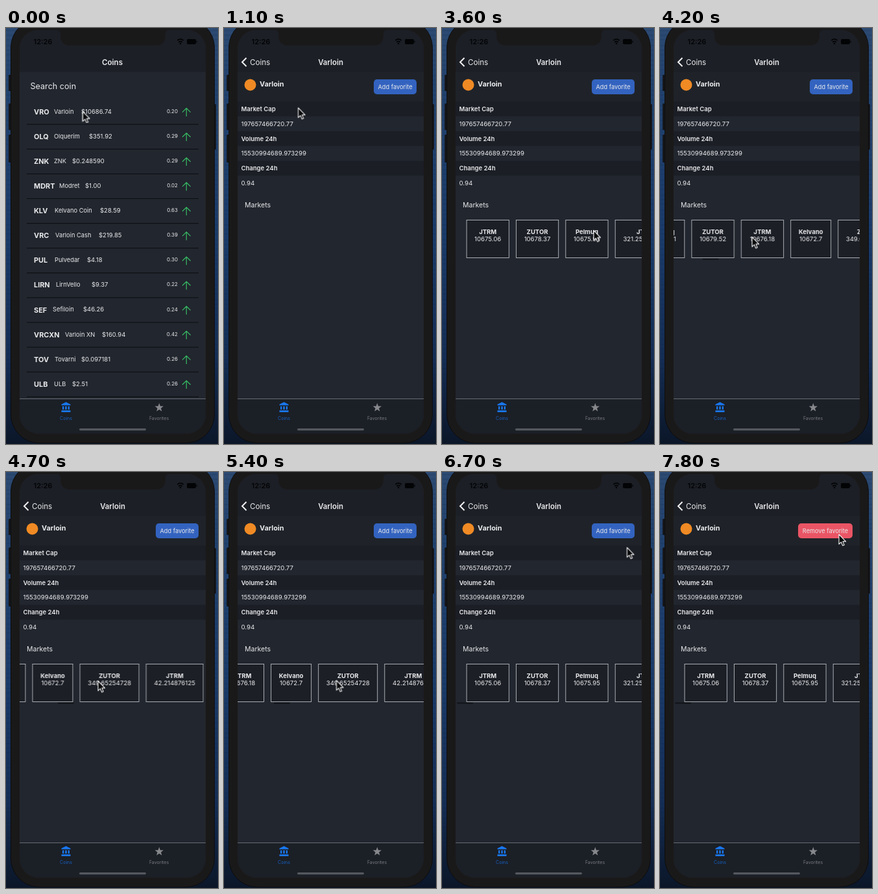
Recreate the animation shown at these times as an HTML page. Size 327x640 px, loop 8 s.

```html
<!DOCTYPE html>
<html lang="en">
<head>
<meta charset="utf-8">
<title>Coins</title>
<style>
html, body { margin: 0; width: 100%; height: 100%; overflow: hidden; background: #0c1a30; }
svg { display: block; width: 327px; height: 640px; font-family: Inter, Roboto, sans-serif; fill: #e9eaec; }
.anim { animation: 8s linear infinite both; }
.b { font-weight: 700; }
.sb { font-weight: 600; }
.mid { text-anchor: middle; }
.end { text-anchor: end; }

/* push from the list to the detail page */
#list { animation-name: listOut; }
#detail { animation-name: detailIn; }
#listTitle { animation-name: titleOut; }
#back { animation-name: backIn; }
#title { animation-name: titleIn; }
@keyframes listOut {
  0%, 5.6% { transform: none; animation-timing-function: cubic-bezier(.2, .7, .2, 1); }
  12%, 100% { transform: translateX(-86px); }
}
@keyframes detailIn {
  0%, 5.6% { transform: translateX(290px); animation-timing-function: cubic-bezier(.2, .7, .2, 1); }
  12%, 100% { transform: none; }
}
@keyframes titleOut {
  0%, 5.6% { transform: none; opacity: 1; animation-timing-function: cubic-bezier(.2, .7, .2, 1); }
  12%, 100% { transform: translateX(-109px); opacity: 0; }
}
@keyframes backIn {
  0%, 5.6% { transform: translateX(109px); opacity: 0; animation-timing-function: cubic-bezier(.2, .7, .2, 1); }
  12%, 100% { transform: none; opacity: 1; }
}
@keyframes titleIn {
  0%, 5.6% { transform: translateX(130px); opacity: 0; animation-timing-function: cubic-bezier(.2, .7, .2, 1); }
  12%, 100% { transform: none; opacity: 1; }
}

/* market cards: load, fling left, fling back */
#market { animation-name: load; animation-timing-function: step-end; }
@keyframes load { 0% { opacity: 0; } 18.75%, 100% { opacity: 1; } }
#cards { animation-name: scroll; }
@keyframes scroll {
  0%, 46.25% { transform: none; animation-timing-function: ease-in; }
  49.4% { transform: translateX(-92px); animation-timing-function: cubic-bezier(.2, .6, .4, 1); }
  58.75%, 66.25% { transform: translateX(-635.6px); animation-timing-function: ease-in; }
  70% { transform: translateX(-437px); animation-timing-function: cubic-bezier(.25, .5, .6, .9); }
  75% { transform: translateX(-121px); animation-timing-function: ease-out; }
  80%, 100% { transform: none; }
}
#thumb { animation-name: thumb; }
@keyframes thumb {
  0%, 46.24% { transform: none; opacity: 0; }
  46.25% { transform: none; opacity: 1; animation-timing-function: ease-in; }
  49.4% { transform: translateX(8px); animation-timing-function: cubic-bezier(.2, .6, .4, 1); }
  58.75%, 66.25% { transform: translateX(57px); animation-timing-function: ease-in; }
  70% { transform: translateX(38px); }
  75% { transform: translateX(6px); animation-timing-function: ease-out; }
  80%, 100% { transform: none; opacity: 1; }
}

#add { animation-name: addOff; animation-timing-function: step-end; }
#remove { animation-name: removeOn; animation-timing-function: step-end; }
@keyframes addOff { 0% { opacity: 1; } 87.5% { opacity: .5; } 88.75%, 100% { opacity: 0; } }
@keyframes removeOn { 0% { opacity: 0; } 88.75%, 100% { opacity: 1; } }

#cursor { animation-name: pointer; animation-timing-function: ease-in-out; }
@keyframes pointer {
  0% { transform: translate(118.5px, 128.5px); }
  5%, 17.5% { transform: translate(114.5px, 122.8px); }
  25%, 29% { transform: translate(114.5px, 274.5px); }
  42%, 46.25% { transform: translate(234px, 311.5px); animation-timing-function: ease-in; }
  49.4%, 66.25% { transform: translate(142px, 321.5px); animation-timing-function: ease-in; }
  70% { transform: translate(340px, 316px); }
  78% { transform: translate(334px, 220px); }
  86%, 100% { transform: translate(276px, 96px); }
}
</style>
</head>
<body>
<svg viewBox="0 0 327 640">
  <defs>
    <linearGradient id="wall" x2="0" y2="1">
      <stop offset="0" stop-color="#2c4a72"/>
      <stop offset=".15" stop-color="#21426e"/>
      <stop offset=".5" stop-color="#1a3b6a"/>
      <stop offset=".8" stop-color="#142d54"/>
      <stop offset="1" stop-color="#0b1628"/>
    </linearGradient>
    <pattern id="grain" width="327" height="23" patternUnits="userSpaceOnUse">
      <path d="M0 4H327M0 11H327M0 18H327" stroke="#081426" stroke-width="1.2" opacity=".22"/>
    </pattern>
    <clipPath id="screen"><rect x="21" y="3" width="287" height="621" rx="29"/></clipPath>
  </defs>

  <rect width="327" height="640" fill="url(#wall)"/>
  <rect width="327" height="640" fill="url(#grain)"/>
  <g fill="#15161a">
    <rect x="4" y="72" width="6" height="25" rx="1.5"/>
    <rect x="4" y="116" width="6" height="41" rx="1.5"/>
    <rect x="4" y="164" width="6" height="43" rx="1.5"/>
    <rect x="319" y="117" width="5" height="70" rx="1.5"/>
  </g>
  <rect x="7.5" y="-14" width="314" height="652.5" rx="44" fill="#1a1919" stroke="#0c0c0e"/>

  <g clip-path="url(#screen)">
    <rect x="21" y="0" width="287" height="640" fill="#22262e"/>
    <g id="list" class="anim"></g>
    <g id="detail" class="anim">
      <rect x="21" y="67" width="287" height="504" fill="#22262e"/>
      <rect x="21" y="67" width="287" height="46" fill="#1f2329"/>
      <circle cx="40.5" cy="87.5" r="9" fill="#f08a24"/>
      <text x="55" y="89.9" class="b" font-size="10.8">Varloin</text>
      <g id="add" class="anim">
        <rect x="231" y="79" width="66" height="23" rx="5" fill="#3363c0"/>
        <text x="264" y="93.9" class="mid" font-size="9.2">Add favorite</text>
      </g>
      <g id="remove" class="anim">
        <rect x="213" y="79" width="84" height="23" rx="5" fill="#ea5565"/>
        <text x="255" y="93.9" class="mid" font-size="9.2">Remove favorite</text>
      </g>
      <g id="stats"></g>
      <text x="32" y="276.2" font-size="10.5">Markets</text>
      <g id="market" class="anim">
        <g id="cards" class="anim"></g>
        <rect id="thumb" class="anim" x="23" y="354.5" width="25" height="2" rx="1" fill="#111317"/>
      </g>
    </g>

    <rect x="21" y="0" width="287" height="67.5" fill="#1c1f26"/>
    <text id="listTitle" class="anim mid sb" x="164" y="56.7" font-size="11.6">Coins</text>
    <g id="back" class="anim">
      <path d="M34.5 46L28 52.5L34.5 59" fill="none" stroke="#f2f2f4" stroke-width="2"/>
      <text x="40" y="56.7" font-size="11.6">Coins</text>
    </g>
    <text id="title" class="anim mid sb" x="164.5" y="56.7" font-size="11.4">Varloin</text>

    <rect x="21" y="570" width="287" height="60" fill="#1b1f26"/>
    <path d="M21 570.5H308" stroke="#70747c" stroke-width=".9"/>
    <g fill="#1877ee">
      <path d="M92.5 575.5L99.5 579V580.5H85.5V579ZM87 582H89.3V587H87ZM91.3 582H93.7V587H91.3ZM95.7 582H98V587H95.7ZM85.5 588.3H99.5V591H85.5Z"/>
      <text x="92.5" y="602.7" class="mid" font-size="7" fill="#1762c0">Coins</text>
    </g>
    <g fill="#86888c">
      <path id="star"/>
      <text x="236" y="602.7" class="mid" font-size="7" fill="#797b80">Favorites</text>
    </g>
    <rect x="113" y="616" width="103" height="3.2" rx="1.6" fill="#55585e"/>

    <g fill="#030405">
      <text x="42.5" y="25" class="sb" font-size="11">12:26</text>
      <g fill="none" stroke="#030405" stroke-width="1.8">
        <path d="M264.3 19.2Q269 15 273.7 19.2M266.3 21.8Q269 19.4 271.7 21.8"/>
      </g>
      <circle cx="269" cy="24" r="1.3"/>
      <rect x="279" y="17" width="14" height="8" rx="2"/>
      <rect x="293.6" y="19.5" width="1.2" height="3" rx=".6"/>
    </g>
  </g>
  <path d="M78 0V3Q84 3 84 9V11Q84 27 100 27H230Q246 27 246 11V9Q246 3 252 3V0Z" fill="#1a1919"/>

  <g id="cursor" class="anim">
    <path d="M0 0V15L3.4 11.8L5.8 17.2L8.2 16.2L5.9 10.9H10.6Z" fill="#08090b" stroke="#f4f4f4" stroke-width="1.1" stroke-linejoin="round"/>
  </g>
</svg>
<script>
const el = id => document.getElementById(id);
const text = (x, y, size, str, cls = '') =>
  `<text x="${x}" y="${y}" font-size="${size}" class="${cls}">${str}</text>`;

// symbol, name, name x, price, price x, change
const coins = [
  ['VRO', 'Varloin', 74, '10686.74', 116, '0.20'],
  ['OLQ', 'Olquerim', 74, '351.92', 128, '0.29'],
  ['ZNK', 'ZNK', 74, '0.248590', 102, '0.29'],
  ['MDRT', 'Modret', 82, '1.00', 122, '0.02'],
  ['KLV', 'Kelvano Coin', 75, '28.59', 145, '0.63'],
  ['VRC', 'Varloin Cash', 76, '219.85', 143, '0.39'],
  ['PUL', 'Pulvedar', 75, '4.18', 125, '0.30'],
  ['LIRN', 'LirnVello', 77, '9.37', 132, '0.22'],
  ['SEF', 'Sefiloin', 72, '46.26', 119, '0.24'],
  ['VRCXN', 'Varloin XN', 91, '160.94', 148, '0.42'],
  ['TOV', 'Tovarni', 75, '0.097181', 116, '0.26'],
  ['ULB', 'ULB', 74, '2.51', 102, '0.26']
];
el('list').innerHTML = text(37.5, 94.2, 12.6, 'Search coin') +
  coins.map(([sym, name, nx, price, px, change], i) =>
    `<g transform="translate(0 ${(128.4 + i * 38.1).toFixed(1)})">` +
    text(43, 4.3, 10.9, sym, 'b') + text(nx, 3.2, 9.3, name) +
    text(px, 3.2, 9.5, '$' + price) + text(265, 2.3, 8, change, 'end') +
    '<path d="M278.3 7.5V-5M272 1.2L278.3 -5L284.6 1.2" fill="none" stroke="#37bd65" stroke-width="1.2"/>' +
    '<path d="M32 19.8H297" stroke="#0b0d10"/></g>').join('');

const stats = [
  ['Market Cap', '197657466720.77'],
  ['Volume 24h', '15530994689.973299'],
  ['Change 24h', '0.94']
];
el('stats').innerHTML = stats.map(([label, value], i) => {
  const y = 113 + i * 45.7;
  return `<rect x="21" y="${y}" width="287" height="22.8" fill="#1b1e25"/>` +
    text(26.5, y + 14.9, 9.5, label, 'sb') + text(26.5, y + 37.6, 9.6, value);
}).join('');

// name, price, card width
const markets = [
  ['JTRM', '10675.06', 65.3], ['ZUTOR', '10678.37', 65.3], ['Pelmuq', '10675.95', 65.3],
  ['JTRM', '321.252767145', 92.7], ['RolVanta', '10691.68', 65.3],
  ['Pelmuq', '10674.31', 65.3], ['ZUTOR', '10679.52', 65.3], ['JTRM', '10676.18', 65.3],
  ['Kelvano', '10672.7', 62], ['ZUTOR', '349.65254728', 91], ['JTRM', '42.214876125', 88]
];
let left = 38;
el('cards').innerHTML = markets.map(([name, price, w]) => {
  const mid = left + w / 2;
  const card = `<rect x="${left}" y="295.5" width="${w}" height="58" fill="#1c1f26" stroke="#b9bcc2" stroke-width=".9"/>` +
    text(mid, 316.7, 9.5, name, 'b mid') + text(mid, 328.4, 9.6, price, 'mid');
  left += w + 11.1;
  return card;
}).join('');

const points = Array.from({ length: 10 }, (_, i) => {
  const r = i % 2 ? 2.9 : 7, a = i * Math.PI / 5;
  return `${(236.3 + r * Math.sin(a)).toFixed(2)} ${(584 - r * Math.cos(a)).toFixed(2)}`;
});
el('star').setAttribute('d', `M${points.join('L')}Z`);
</script>
</body>
</html>
```
